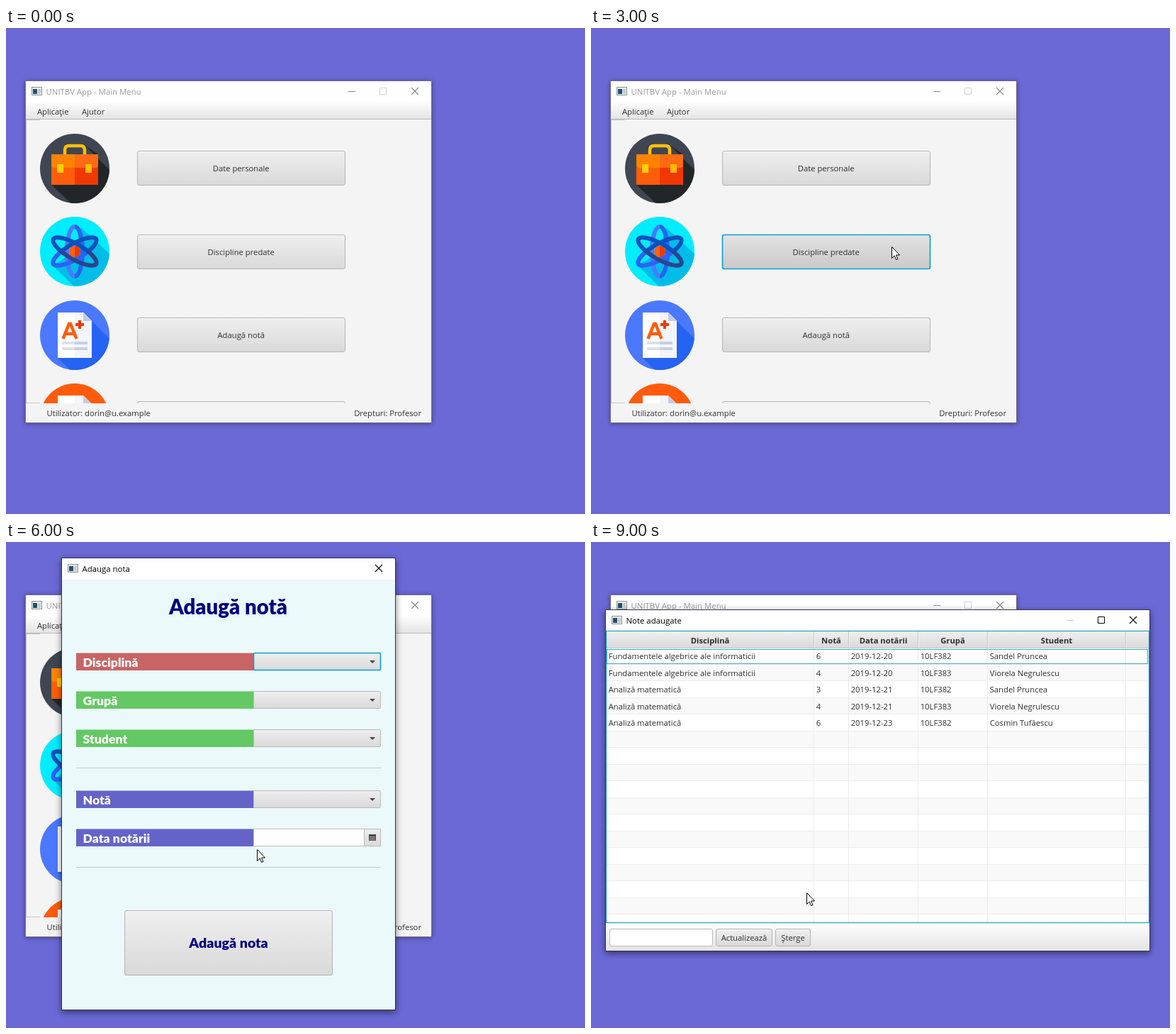
Write an HTML page that moves like this. It is 817 px wide and 685 px high and loops after 10000 ms.

```html
<!DOCTYPE html>
<html lang="ro">
<head>
<meta charset="utf-8">
<title>Main Menu</title>
<style>
  html, body { margin: 0; width: 100%; height: 100%; overflow: hidden; background: #6b69d6; }
  svg { display: block; }
  text { font: 11.25px "Open Sans", "Noto Sans", sans-serif; fill: #2f2f2f; white-space: pre; }
  .title { font-size: 11.4px; fill: #000; }
  .dim { fill: #999; }
  .bold { font-weight: 700; }
  .mid { text-anchor: middle; }
  .end { text-anchor: end; }
  .heading { font: 900 29.4px Lato, sans-serif; }
  .value { font: 900 19.6px Lato, sans-serif; }
  .light { font: 300 20px Lato, sans-serif; fill: #111; }
  .label { font: 900 17.7px Lato, sans-serif; fill: #fff; }
  .navy { fill: #000080; }
  .green { fill: #207a00; }
  .active { filter: drop-shadow(0 3px 5px rgba(0, 0, 0, .5)); }
  .inactive { filter: drop-shadow(0 1px 3px rgba(0, 0, 0, .4)); }
</style>
</head>
<body>
<svg width="817" height="685" viewBox="0 0 817 685">
  <defs>
    <linearGradient id="face" x2="0" y2="1"><stop stop-color="#efefef"/><stop offset="1" stop-color="#d9d9d9"/></linearGradient>
    <linearGradient id="hot" x2="0" y2="1"><stop stop-color="#e3e3e3"/><stop offset="1" stop-color="#c9c9c9"/></linearGradient>
    <linearGradient id="bar" x2="0" y2="1"><stop stop-color="#fdfdfd"/><stop offset="1" stop-color="#e4e4e4"/></linearGradient>
    <linearGradient id="orbitA" x2="0" y2="1"><stop offset=".5" stop-color="#0b50bf"/><stop offset=".5" stop-color="#2a63f5"/></linearGradient>
    <linearGradient id="orbitB" x2="0" y2="1"><stop offset=".5" stop-color="#0b50bf"/><stop offset=".5" stop-color="#2a4590"/></linearGradient>
    <linearGradient id="orbitC"><stop offset=".5" stop-color="#4a79ff"/><stop offset=".5" stop-color="#2664f0"/></linearGradient>
    <clipPath id="disc"><circle r="49"/></clipPath>
    <clipPath id="pane"><rect x="28" y="129" width="572" height="400"/></clipPath>
  </defs>
  <g id="stage"></g>
</svg>
<script>
const rect = (x, y, w, h, fill, extra = '') =>
  `<rect x="${x}" y="${y}" width="${w}" height="${h}" fill="${fill}" ${extra}/>`;
const path = (d, fill, stroke = 'none', width = 1) =>
  `<path d="${d}" fill="${fill}" stroke="${stroke}" stroke-width="${width}"/>`;
const line = (d, color, width = 1) => path(d, 'none', color, width);
const text = (x, y, content, cls = '') => `<text x="${x}" y="${y}" class="${cls}">${content}</text>`;

const cursor = (x, y) => `<g transform="translate(${x} ${y})">` +
  path('M.5 .5V16.5L4.2 13L6.7 18.5L9 17.5L6.6 12H11.5Z', '#fff', '#000') + '</g>';

const appIcon = (x, y) =>
  rect(x + .5, y + .5, 14, 11, '#e9eef2', 'stroke="#8d9296"') +
  rect(x + 2, y + 3, 6, 7, '#24506e') + rect(x + 9, y + 3, 4, 7, '#c3ccd2');

// Window frame with title bar; x, y, w, h describe the inside of the border.
function frame(x, y, w, h, title, { active = true, buttons = '', bg = '#f4f4f4' } = {}) {
  const ink = active ? '#000' : '#858585', right = x + w, cy = y + 14;
  let out = rect(x - .5, y - .5, w + 1, h + 1, bg,
    `stroke="${active ? '#35354e' : '#6f6f96'}" class="${active ? 'active' : 'inactive'}"`);
  out += rect(x, y, w, 30, '#fff') + appIcon(x + 8, y + 8) +
    text(x + 28.5, y + 18.5, title, active ? 'title' : 'title dim');
  out += line(`M${right - 28} ${cy - 5}l10 10m0 -10l-10 10`, ink, 1.1);
  if (buttons) {
    const [minColor, maxColor] = buttons == 'min' ? [ink, '#d0d0d0'] : ['#ccc', ink];
    out += line(`M${right - 117} ${cy + .5}h10`, minColor) +
      line(`M${right - 72.5} ${cy - 4.5}h9v9h-9z`, maxColor);
  }
  return out;
}

function button(x, y, w, h, focused) {
  return rect(x + .5, y + .5, w - 1, h - 1, focused ? 'url(#hot)' : 'url(#face)',
    `rx="2.5" stroke="${focused ? '#0a9fd0' : '#b4b4b4'}" stroke-width="${focused ? 1.6 : 1}"`) +
    (focused ? '' : line(`M${x + 3} ${y + 1.5}h${w - 6}`, '#f8f8f8'));
}

const paper = () =>
  path('M-24 -32H12L24 -20V32H-24Z', '#fff') + path('M0 -32H12L24 -20V32H0Z', '#f3f5fb') +
  path('M12 -32L24 -20H12Z', '#c3cce2');
const textLines = ys => ys.map(y =>
  rect(-18, y, 18, 4, '#dbe0ec') + rect(0, y, 18, 4, '#c6cee3')).join('');
const halfDot = () => path('M0 -8A8 8 0 0 0 0 8Z', '#ff6210') + path('M0 -8A8 8 0 0 1 0 8Z', '#f03800');
const orbit = (x, y, angle, paint) =>
  line(`M${x} ${y}A11 35 ${angle} 0 1 ${-x} ${-y}A11 35 ${angle} 0 1 ${x} ${y}Z`, `url(#${paint})`, 6);

const icons = [
  ['#3f4651', path('M14 -33L60 13V60H6L-33 23L33 -20Z', '#212729') +
    line('M-14 -20V-26Q-14 -32 -8 -32H8Q14 -32 14 -26V-20', '#ffbf0a', 4.5) +
    rect(-33, -20, 33, 43, '#ff5d0a') + rect(0, -20, 33, 43, '#f03800') +
    path('M-33 -20H0V-1H-29Q-33 -1 -33 -5Z', '#ff8300') +
    path('M0 -20H33V-5Q33 -1 29 -1H0Z', '#ff6a12') +
    rect(-25, -6, 9, 12, '#ffd000') + rect(15, -6, 9, 12, '#ffbc00')],
  ['#00ecff', path('M8 -34L24 -20L60 14V60H10L-31 20L0 0Z', '#00bce8') +
    orbit(0, -35, 0, 'orbitC') + orbit(30.3, -17.5, 60, 'orbitA') +
    orbit(-30.3, -17.5, -60, 'orbitB') + halfDot()],
  ['#4a78ff', path('M24 -20L60 16V60H4L-24 32Z', '#2563f2') + paper() +
    line('M-16.5 5L-8 -16H-6L2.5 5M-13 -2H-1', '#ff5c0c', 4.6) +
    line('M7 -21V-9M1 -15H13', '#f03800', 4) + textLines([9, 17])],
  ['#ff5b0a', path('M24 -20L60 16V60H4L-24 32Z', '#f03800') + paper() +
    textLines([-15, -7, 1, 9, 17]) +
    '<circle cx="4" cy="-2" r="15" fill="#e9f0f7" fill-opacity=".75" stroke="#262d33" stroke-width="5"/>' +
    line('M15 9L29 22', '#212729', 7)]
];
const menuItems = ['Date personale', 'Discipline predate', 'Adaugă notă', 'Note'];

function mainMenu({ focus = -1, active = false, scroll = 0 } = {}) {
  let rows = '';
  menuItems.forEach((name, i) => {
    const y = Math.round(173 + 117.5 * i) - scroll, cy = Math.floor(198 + 117.5 * i + (i == 2 ? .5 : 0)) - scroll;
    const [color, art] = icons[i];
    rows += `<g transform="translate(97 ${cy})"><circle r="49" fill="${color}"/><g clip-path="url(#disc)">${art}</g></g>` +
      button(185, y, 294, 49, i == focus) + text(331.7, y + 29.3, name, 'mid');
  });
  return frame(28, 75, 572, 481, 'UNITBV App - Main Menu', { active, buttons: 'min' }) +
    rect(28, 105, 572, 23, 'url(#bar)') + line('M28 128.5H600', '#b9b9b9') +
    text(44, 121.5, 'Aplicație') + text(107, 121.5, 'Ajutor') +
    `<g clip-path="url(#pane)">${rows}</g>` +
    line('M28.5 129V529M28 129.5H48M28 528.5H48', '#c4c4c4') +
    text(57.5, 547, 'Utilizator: dorin@u.example') + text(586, 547, 'Drepturi: Profesor', 'end');
}

function personalData() {
  const lines = [
    [198.5, 'Date personale', 'heading navy'],
    [229, 'Nume:', 'light'], [252, 'Sandel Corbeanu', 'value'],
    [282, 'Titlu:', 'light'], [305, 'conferențiar universitar', 'value'],
    [364, 'Date utilizator', 'heading green'],
    [394.5, 'ID:', 'light'], [417.5, '3', 'value'],
    [447, 'E-Mail instituțional:', 'light'], [470.5, 'corbeanu@u.example', 'value']
  ];
  return frame(21, 96, 590, 460, 'Date personale') + line('M21 125.5H611', '#ccc') +
    lines.map(([y, content, cls]) => text(315, y, content, cls + ' mid')).join('');
}

// edges: right edge of each named column
function table(title, bottom, edges, headers, rows) {
  let out = frame(21, 96, 767, 480, title, { buttons: 'max' }) + rect(21, 126, 767, bottom - 126, '#fff');
  const rowHeight = 23.5, top = 149.5;
  for (let i = 0, y = top; y < bottom; y = top + rowHeight * ++i) {
    const h = Math.min(rowHeight, bottom - y);
    out += rect(22, y, 765, h, i % 2 ? '#f9f9f9' : '#fff');
    if (h == rowHeight) out += line(`M22 ${Math.floor(y + rowHeight) - .5}H787`, '#ededed');
  }
  out += rect(22, 126, 765, 24, 'url(#face)') + line('M22 149.5H787', '#c6c6c6');
  edges.forEach((x, i) => {
    const left = i ? edges[i - 1] : 21;
    out += line(`M${x + .5} 150V${bottom}`, '#ebebeb') + line(`M${x + .5} 126V150`, '#c4c4c4') +
      line(`M${x + 1.5} 126V149`, '#f6f6f6') +
      text((left + x) / 2 + .5, 143, headers[i], 'bold mid');
    rows.forEach((row, r) => out += text(left + 3.7, 165.3 + rowHeight * r, row[i]));
  });
  return out + rect(22.5, 151.5, 763, 20, 'none', 'stroke="#3fa9c4"') +
    rect(21.5, 125.5, 766, bottom - 125, 'none', 'stroke="#1fa3c4" stroke-width="1.2"');
}

const math = 'Analiză matematică', algebra = 'Fundamentele algebrice ale informaticii';
const students = { ana: 'Viorela Negrulescu', dan: 'Sandel Pruncea', geo: 'Cosmin Tufăescu' };

const courses = () =>
  table('Discipline predate', 549, [314, 387, 461, 534], ['Nume', 'Credite', 'An', 'Semestru'], [
    [math, 6, 1, 1], [algebra, 5, 1, 1],
    ['Algebră liniară, geometrie analitică şi diferențială', 5, 1, 2]
  ]) + text(25.5, 568.5, 'Nr. discipline predate:') + text(148.5, 568, '3', 'bold');

const grades = () =>
  table('Note adaugate', 536, [314, 363, 461, 559, 754],
    ['Disciplină', 'Notă', 'Data notării', 'Grupă', 'Student'], [
    [algebra, 6, '2019-12-20', '10LF382', students.dan],
    [algebra, 4, '2019-12-20', '10LF383', students.ana],
    [math, 3, '2019-12-21', '10LF382', students.dan],
    [math, 4, '2019-12-21', '10LF383', students.ana],
    [math, 6, '2019-12-23', '10LF382', students.geo]
  ]) + rect(21, 538, 767, 38, 'url(#bar)') +
  rect(26.5, 545.5, 145, 24, '#fff', 'rx="2.5" stroke="#bbb"') +
  button(176, 545, 80, 25) + text(216, 561.7, 'Actualizează', 'mid') +
  button(260, 545, 50, 25) + text(285, 561.7, 'Șterge', 'mid');

function gradeForm(filled) {
  const fields = [
    [156, 'Disciplină', '#c86464', math], [210, 'Grupă', '#64c864', '10LF383'],
    [264, 'Student', '#64c864', students.ana], [350, 'Notă', '#6464c8', '8'],
    [404, 'Data notării', '#6464c8', '1/24/2021']
  ];
  let out = frame(79, 23, 470, 636, 'Adauga nota', { bg: '#ebf9fb' }) +
    text(313.5, 101.5, 'Adaugă notă', 'heading navy mid') +
    line('M99 318.5H529M99 458.5H529', '#c3cbcd');
  fields.forEach(([y, label, color, value], i) => {
    out += rect(99, y + .5, 250.5, 24.5, color) + text(108.5, y + 19.8, label, 'label');
    if (i < 4) {
      const focus = !filled && i == 0;
      out += rect(349.5, y + .5, 179, 24, 'url(#face)',
        `rx="1.5" stroke="${focus ? '#0a9fd0' : '#b9b9b9'}" stroke-width="${focus ? 1.6 : 1}"`) +
        path(`M513 ${y + 11}h8l-4 4z`, '#484848');
    } else {
      out += rect(349.5, y + .5, 156, 24, '#fff', 'stroke="#c0c0c0"') +
        rect(505.5, y + .5, 23, 24, 'url(#face)', 'stroke="#b9b9b9"') +
        rect(512, y + 8, 10, 9, '#4a4a4a') +
        line(`M513 ${y + 11.5}h8m-8 2h8m-8 2h8`, '#c8c8c8', .7);
    }
    if (filled) out += text(357, y + 16.8, value);
  });
  return out + button(167, 519, 294, 92, filled) + text(314, 572, 'Adaugă nota', 'value navy mid');
}

const scenes = [
  () => mainMenu(),
  () => mainMenu({ focus: 0 }) + cursor(330, 209),
  () => mainMenu({ focus: 0 }) + personalData() + cursor(569, 160),
  () => mainMenu({ focus: 1 }) + cursor(424, 308),
  () => mainMenu({ focus: 1 }) + courses() + cursor(424, 308),
  () => mainMenu({ focus: 2, active: true }) + cursor(354, 433),
  () => mainMenu({ focus: 2 }) + gradeForm(false) + cursor(354, 433),
  () => mainMenu({ focus: 2 }) + gradeForm(true) + cursor(234, 574),
  () => mainMenu({ focus: 3, active: true, scroll: 58 }) + cursor(304, 494),
  () => mainMenu({ focus: 3, scroll: 58 }) + grades() + cursor(304, 494)
];

const stage = document.getElementById('stage');
let shown = -1;
function tick() {
  const index = Math.floor(performance.now() / 1000) % scenes.length;
  if (index != shown) stage.innerHTML = scenes[shown = index]();
  requestAnimationFrame(tick);
}
tick();
</script>
</body>
</html>
```
